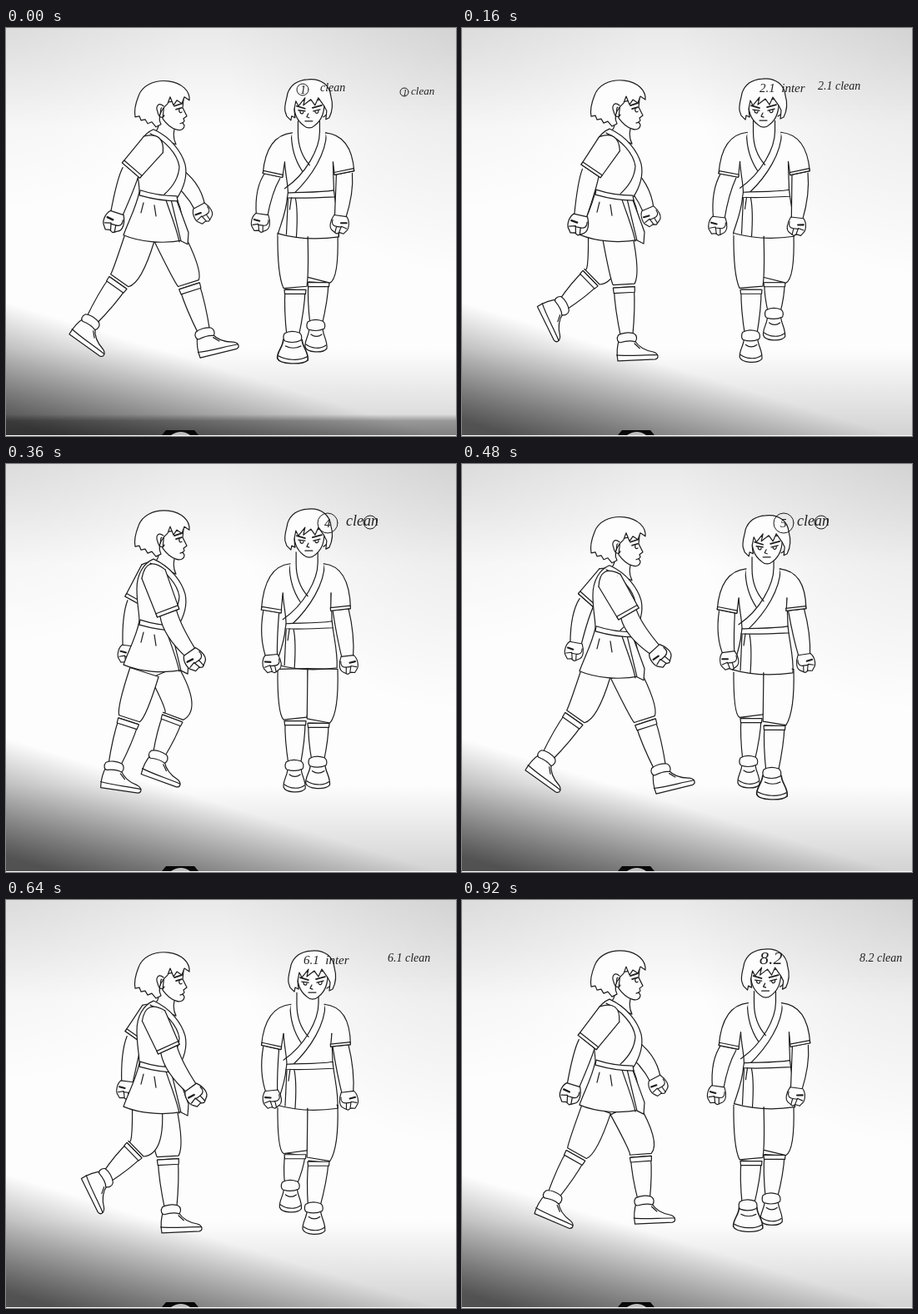
Recreate the animation shown at these times as an HTML page with a canvas. Size 540 by 490 pixels, loop 960 ms.

```html
<!DOCTYPE html>
<html lang="en">
<head>
<meta charset="utf-8">
<title>Walk cycle</title>
<style>
html, body { margin: 0; width: 100%; height: 100%; overflow: hidden; background: #fcfdfc; }
canvas { display: block; }
</style>
</head>
<body>
<canvas id="stage" width="540" height="490"></canvas>
<script>
const ctx = document.getElementById('stage').getContext('2d');
const PAPER = '#fcfdfc', INK = '#1d1d1d', STEP = 40, LOOP = 960, HALF = LOOP / 2;
const { sin, cos, PI, hypot, atan2, max, floor } = Math;

const turn = t => 2 * PI * t / LOOP;
const mix = (a, b, k) => a.map((v, i) => v + (b[i] - v) * k);

// One leg, from heel contact: planted for half the loop, then swinging forward
function gait(t) {
  const u = t % HALF / HALF, planted = t % LOOP < HALF;
  const lift = planted ? 0 : sin(PI * u ** .6);
  return {
    p: turn(t), lift,
    press: planted ? sin(PI * u) : 0,
    back: planted ? (u + u * u * (3 - 2 * u)) / 2 : 1 - u ** 1.8,
    roll: planted ? .62 * u ** 5 - .24 * (1 - u) ** 4 : .62 - .86 * u + .78 * lift
  };
}

// Arm joints between a back and a front pose [cuff, elbow, fist], hanging lower midway
function swing(t, back, front, dip) {
  const c = cos(turn(t) - .15), g = c * (1.5 - .5 * c * c);
  return back.map((joint, i) => {
    const [x, y] = mix(joint, front[i], (1 - g) / 2);
    return [x, y + dip * i / 2 * (1 - g * g)];
  });
}

function ink(d, fill, width = 1.2) {
  const path = typeof d === 'string' ? new Path2D(d) : d;
  if (fill) { ctx.fillStyle = fill; ctx.fill(path); }
  ctx.lineWidth = width;
  ctx.stroke(path);
}
const solid = d => ink(d, PAPER);

function moved(x, y, draw, angle = 0, sx = 1, sy = sx) {
  ctx.save();
  ctx.translate(x, y);
  ctx.rotate(angle);
  ctx.scale(sx, sy);
  draw();
  ctx.restore();
}

// The two points beside p, at right angles to the way from a to b
function beside(p, a, b, w) {
  const k = w / (hypot(b[0] - a[0], b[1] - a[1]) || 1);
  const dx = k * (b[1] - a[1]), dy = k * (a[0] - b[0]);
  return [[p[0] + dx, p[1] + dy], [p[0] - dx, p[1] - dy]];
}

// Outline around two or three points with half widths
function limb(points, widths, open = false) {
  const pairs = points.map((p, i) => beside(p, points[max(i - 1, 0)], points[i + 1] || p, widths[i]));
  const edge = ([a, m, b]) => b
    ? `Q${2 * m[0] - (a[0] + b[0]) / 2},${2 * m[1] - (a[1] + b[1]) / 2} ${b}` : `L${m}`;
  const one = pairs.map(q => q[0]), two = pairs.map(q => q[1]).reverse();
  solid(`M${one[0]}${edge(one)}L${two[0]}${edge(two)}${open ? '' : 'Z'}`);
}

function forearm([cuff, elbow, fist], size, flip = 1) {
  limb([cuff, elbow, mix(elbow, fist, .8)], [10, 10, 7].map(w => w * size), true);
  moved(...fist, () => {
    solid('M-8-10C-13-5-13 5-10 8L-7 12L-2 11L2 13L7 10C13 7 12-2 8-10Z');
    ink('M-10 5L-3 3L-1 11M-3 4L3 4L4 12M3 4C8 4 10 1 9-4');
    ink('M-9-2L-2-1', null, 2.2);
  }, atan2(fist[1] - elbow[1], fist[0] - elbow[0]) - PI / 2, size * flip, size);
}

const hem = (from, cuff, w) => limb([mix(from, cuff, .91), cuff], [w, w]);

function sideArm(joints, shoulder, size) {
  const [cuff] = joints, [right, left] = beside(shoulder, shoulder, cuff, 15);
  forearm(joints, size);
  limb([shoulder, cuff], [15, 14], true);
  ink(`M${left}Q${mix(shoulder, cuff, -.5)} ${right}`, PAPER);
  hem(shoulder, cuff, 14);
}

function frontArm(joints, side, shift, rise) {
  const [cuff] = joints, spot = (x, y) => [363 + side * x + shift, y + rise];
  const shoulder = spot(36, 142), ends = beside(cuff, shoulder, cuff, 12);
  const [outer, inner] = side > 0 ? ends : ends.reverse();
  forearm(joints, .95, -side);
  solid(`M${spot(20, 126)}Q${spot(51, 129)} ${outer}L${inner}L${spot(29, 161)}`);
  hem(shoulder, cuff, 12);
}

function sideLeg(t) {
  const { p, back, lift, press, roll } = gait(t);
  const hip = [178 + 17 * cos(p), 250], knee = [180 + 33 * cos(p) - 4 * sin(p), 288];
  const ankle = [238 - 136 * back, 366 - 14 * back - 21 * lift + 11 * press];
  const band = mix(knee, ankle, .28);
  limb([band, mix(band, ankle, .45), ankle], [12, 11, 7]);
  moved(...ankle, () => {
    solid('M-9 2C-13 12-13 20-12 28L33 28C38 27 37 21 31 19C22 17 14 13 9 4Z');
    ink('M-13 21C0 23 20 22 36 23M9 8L15 14');
    solid('M-10-3C-13 1-11 6-8 6C0 4 5 4 10 6C13 3 12-2 9-4C3-6-5-6-10-3Z');
  }, roll);
  limb([band, mix(band, ankle, .11)], [13, 12.5]);
  limb([hip, knee, mix(knee, band, .85)], [18, 17, 13]);
}

function sideBody() {
  solid('M184 108C184 120 181 125 175 129L204 140C200 132 201 126 203 117');
  solid('M177 122C165 127 157 140 157 158C157 176 160 186 160 197C156 216 147 232 141 249' +
    'C160 257 188 260 213 255C214 236 210 217 205 205C214 191 218 178 215 164C211 150 199 132 177 122Z');
  ink('M173 127C191 135 206 152 208 167C207 182 199 192 190 200');
  solid('M198 206L210 256L218 260L219 246L204 205M192 207C198 225 205 242 208 257');
  solid('M161 195C176 200 190 202 205 202L206 208C190 208 174 205 160 201Z');
  ink('M165 210L162 222M178 213L180 226');
}

function sideHead() {
  solid('M190 90L213 86L212 96L217 106L213 109L214 112L212 114L214 117C214 122 209 124 204 122C197 120 193 116 188 109Z');
  solid('M220 87C221 76 211 66 195 64C177 62 163 70 159 82C155 92 154 102 155 107L160 106L162 111L167 110' +
    'L170 115L175 113L180 119L186 116C183 110 183 103 190 95L194 91L197 83L201 93L205 87L211 91L214 83Z');
  ink('M189 94C183 89 179 94 182 101C183 107 188 110 190 105M187 96C184 97 187 100 185 103');
  ink('M202 94L211 91M204 98L211 96', null, 1.7);
  ink('M208 97C207 101 209 103 211 101M209 115L212 114');
}

function frontLeg(t, side) {
  const { p, back, lift, press } = gait(t);
  const foot = [358 + side * (14 - 3 * sin(p)), 403 - 14 * back - 16 * lift + 3 * press];
  const ankle = mix(foot, [foot[0], foot[1] - 32], 1);
  const band = [361 + side * 14, 310 + 5 * cos(p - .5)];
  limb([band, mix(band, ankle, .45), ankle], [12, 11, 7]);
  moved(...foot, () => {
    solid('M-8-29C-8-20-14-14-13-6C-11 1 8 2 13-4C14-14 8-20 8-29Z');
    ink('M-12-9C-5-4 5-3 12-8M-6-21C-2-18 3-18 7-21');
  }, 0, 1 + .4 * max(0, cos(p)) ** 4, 1);
  moved(...ankle, () => solid('M-10-4C-12 0-11 4-9 5C-3 7 4 7 10 4C12 0 10-4 8-5C2-7-5-7-10-4Z'));
  limb([band, [band[0], band[1] + 5]], [13, 12.5]);
  limb([[362 + side * 18, 246], [362 + side * 17, 287], [band[0], band[1] - 3]], [18, 17.5, 14]);
}

function frontBody() {
  ctx.fillStyle = PAPER;
  ctx.fill(new Path2D('M350 110V126L320 142L334 162L338 199L326 250L398 251L394 205L392 160L406 142L376 125V110Z'));
  ink('M350 112V126C350 142 355 155 364 165M376 112V125C376 145 360 175 334 193');
  ink('M342 127C342 146 347 160 355 172M384 126C384 150 367 178 345 199');
  ink('M334 161C335 177 338 188 338 199M392 161C392 176 393 186 393 199');
  ink('M337 204C336 220 330 234 326 247C350 254 378 254 399 251C400 234 396 218 394 203');
  solid('M338 198C355 197 375 198 393 195L394 203C375 204 355 205 337 204Z');
  ink('M338 205L336 248M347 205C350 220 349 236 348 251M342 204L340 218');
}

function frontHead() {
  solid('M344 93C338 90 338 103 346 107M381 93C388 90 388 103 380 107');
  solid('M345 88C344 101 348 111 356 117C360 121 366 121 370 117C378 111 382 101 381 86Z');
  solid('M346 108L342 106L341 111L336 106L334 100C333 92 336 86 337 79C340 70 348 63 361 62C378 60 388 70 389 82' +
    'C392 92 391 100 387 108L383 110L384 100L381 94L374 84L370 93L365 86L356 93L358 84L350 94L347 88L345 98Z');
  ink('M348 94L358 97M367 96L378 93', null, 1.7);
  ink('M350 99L358 100M368 100L376 98', null, 1.4);
  ink('M352 100C352 104 356 104 356 101M370 100C370 104 375 103 374 99M362 103L360 107L363 108M358 112L367 112');
}

function shade(gradient, stops, y = 0) {
  stops.forEach(([k, a]) => gradient.addColorStop(k, `rgba(0,0,0,${a})`));
  ctx.fillStyle = gradient;
  ctx.fillRect(0, y, 540, 489 - y);
}

function paper(first) {
  ctx.fillStyle = PAPER;
  ctx.fillRect(0, 0, 540, 490);
  shade(ctx.createLinearGradient(0, 0, 0, 120), [[0, .08], [1, 0]]);
  shade(ctx.createRadialGradient(560, 0, 0, 560, 0, 300), [[0, .1], [1, 0]]);
  shade(ctx.createRadialGradient(0, 0, 0, 0, 0, 220), [[0, .06], [1, 0]]);
  shade(ctx.createLinearGradient(150, 375, 110, 505), [[0, 0], [.5, .31], [1, .62]]);
  shade(ctx.createLinearGradient(0, 385, 0, 490), [[0, 0], [1, .17]]);
  if (first) shade(ctx.createLinearGradient(0, 464, 0, 490), [[0, 0], [.3, .3], [1, .4]], 464);
  ctx.fillStyle = '#080808';
  ctx.fill(new Path2D('M187 489L192 483H226L231 489Z'));
  ctx.fillStyle = '#bbb';
  ctx.fill(new Path2D('M198 489Q210 481 221 489Z'));
}

function write(text, x, y, size) {
  ctx.font = `italic ${size}px "Liberation Serif", serif`;
  ctx.fillStyle = '#222';
  ctx.fillText(text, x, y);
}

function ring(x, y, r) {
  ctx.lineWidth = 1;
  ctx.beginPath();
  ctx.arc(x, y, r, 0, 7);
  ctx.stroke();
}

// Every third drawing is a ringed key; the two after it are in-betweens
function notes(i) {
  const group = floor(i / 3), sub = i % 3, label = `${group + 1}.${sub}`;
  const right = [474, 427, 420, 408, 402, 458, 474, 477][group];
  if (i === 0) {
    ring(356, 74, 7);
    write('1', 353, 79, 14);
    write('clean', 377, 76, 14);
    ring(478, 77, 5);
    write('1', 476, 81, 11);
    write('clean', 486, 80, 13);
  } else if (sub === 0) {
    ring(386, 71, 12);
    write(group + 1, 382, 76, 15);
    write('clean', right, 74, 18);
    ring(right + 29, 70, 8);
  } else {
    write(sub === 1 ? label + '  inter' : label, 357, 77, sub === 1 ? 15 : 22);
    write(label + ' clean', right, 74, 14);
  }
}

function frame(now) {
  const t = floor(now % LOOP / STEP) * STEP, other = t + HALF, p = turn(t);
  const rise = 5.5 * sin(2 * p + .6) - 3.3;
  const chestX = 2.5 * cos(p + .3) - 1.5, headX = 2 - 3 * sin(p + .4);
  ctx.lineJoin = ctx.lineCap = 'round';
  ctx.strokeStyle = INK;
  paper(t === 0);

  const far = swing(other, [[150, 165], [142, 186], [135, 224]], [[198, 172], [220, 192], [236, 222]], 10);
  const near = swing(t, [[150, 171], [143, 191], [130, 232]], [[200, 180], [211, 201], [238, 230]], 10);
  sideArm(far, [176, 136 + rise], .95);
  sideLeg(other);
  sideLeg(t);
  moved(0, rise, () => { sideBody(); sideHead(); });
  sideArm(near, [177, 140 + rise], 1.05);

  const left = swing(t, [[320, 177], [311, 198], [306, 233]], [[318, 177], [317, 205], [321, 235]], 10);
  const right = swing(other, [[401, 175], [407, 205], [412, 238]], [[406, 174], [405, 199], [400, 235]], 6);
  const legs = [[t, -1], [other, 1]];
  if (gait(t).back < gait(other).back) legs.reverse();
  legs.forEach(leg => frontLeg(...leg));
  moved(chestX / 2, rise * .8, frontBody);
  frontArm(left, -1, chestX / 2, rise * .8);
  frontArm(right, 1, chestX / 2, rise * .8);
  moved(headX, rise, frontHead);
  notes(t / STEP);
  requestAnimationFrame(frame);
}
requestAnimationFrame(frame);
</script>
</body>
</html>
```
